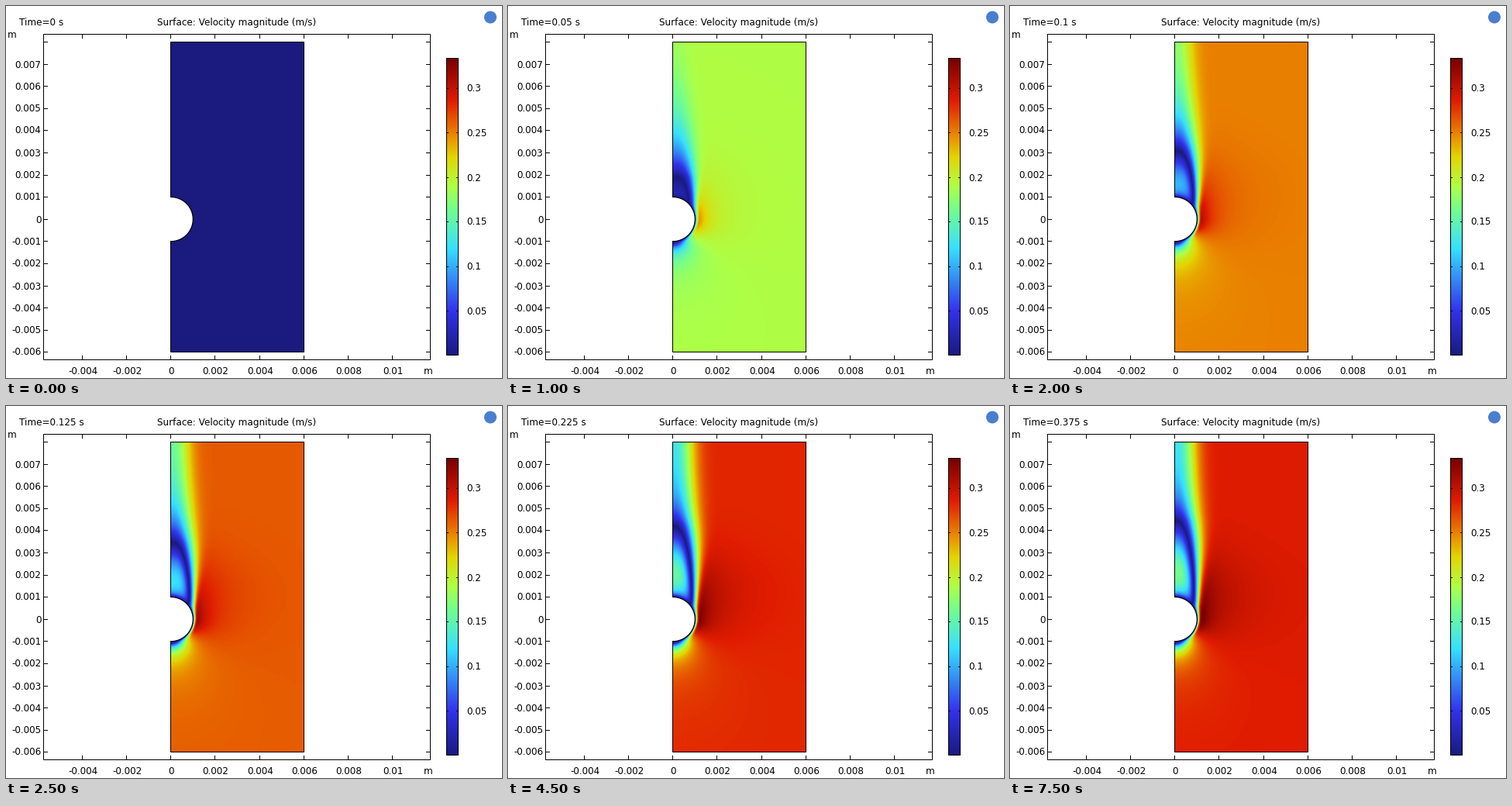
Write a matplotlib script that moves like this. It is 640x480 px and loops after 8000 ms.

```python
import numpy as np
import matplotlib.pyplot as plt
from matplotlib.animation import FuncAnimation
from matplotlib.colors import LinearSegmentedColormap
from matplotlib.patches import Circle, Polygon

W, H, DPI = 640, 480, 100
FRAMES, INTERVAL, DT = 16, 500, 0.025
PX = 72 / DPI
X0, Y0, R = 212.7, 275.1, 28.6  # sphere centre and radius in pixels
LEFT, RIGHT, TOP, BOTTOM = 212.5, 384.5, 46.5, 446.5
VMAX = 0.333

plt.rcParams["font.family"] = "DejaVu Sans"

CMAP = LinearSegmentedColormap.from_list("flow", [
    (0.00, "#1a1a7f"), (0.15, "#3232ec"), (0.36, "#36e0ff"),
    (0.50, "#78ff87"), (0.57, "#adff47"), (0.67, "#e4d400"),
    (0.745, "#ea8700"), (0.86, "#e01c00"), (1.00, "#7a0000")], N=512)

cols = np.arange(213, 385) + 0.5
rows = np.arange(46, 447) + 0.5
X, Y = np.meshgrid((cols - X0) / R, (Y0 - rows) / R)
UP, DOWN = np.maximum(Y, 0), np.minimum(Y, 0)
DIST = np.maximum(np.hypot(X, Y), 1.0)
GAP = DIST - 1


def axis_speed(length, fade):
    """Relative speed on the symmetry axis: backflow, then recovery."""
    back = 0.32 * np.sqrt(max(length - 1.8, 0))
    xi = np.clip((Y - 0.6) / max(length - 0.6, 0.1), 0, 1)
    past = np.maximum(Y - length, 0) / (1.1 + 1.3 * fade)
    return ((0.46 + 0.7 * fade) * (1 - np.exp(-past))
            - back * np.sin(np.pi * xi ** 0.8))


def velocity(t):
    speed = 0.288 * (1 - np.exp(-23.4 * t / (1 + 1.5 * t)))
    length = 4.5 - 4.83 * np.exp(-t / 0.081)  # end of the backflow zone
    fade = np.exp(-(t / 0.105) ** 2)          # share of the starting flow

    # Flow around the sphere, pushed outward by the growing wake
    side = 1 + (0.2 + 0.35 * fade) / DIST ** 3
    outer = np.hypot((1 - DIST ** -2.8) * DOWN / DIST,
                     side * np.where(Y < 0, X / DIST, 1))
    outer += (0.1 * (1 - fade) * np.exp(-((Y - 1.2) / 2) ** 2)
              * np.exp(-np.maximum(X - 1.2, 0) / 1.5)
              * np.clip(GAP / 0.2, 0, 1))

    # Shear layer between the wake and the outer flow
    width = 1.07 - (0.15 + 0.36 * fade) * UP / 8 + 0.1 * np.maximum(DOWN, -1)
    power = 2.3 + 10 * np.exp(-UP / 1.1)
    mix = 1 - np.exp(-(np.hypot(X, DOWN) / width) ** power)
    core = axis_speed(length, fade)
    wake = core + (1 - core) * mix

    # No-slip layer on the sphere
    wall = 1 - np.exp(-GAP / (0.04 + 0.08 * (Y / DIST) ** 4))
    return speed * np.abs(outer * wake * wall)


fig = plt.figure(figsize=(W / DPI, H / DPI), dpi=DPI, facecolor="white")
ax = fig.add_axes([0, 0, 1, 1])
ax.set_axis_off()


def line(xs, ys, width=1.0):
    ax.plot(xs, ys, color="black", lw=width * PX, snap=False,
            solid_capstyle="projecting", solid_joinstyle="miter")


def box(x0, y0, x1, y1):
    line([x0, x1, x1, x0, x0], [y0, y0, y1, y1, y0])


def ticks(x, y, dx, dy):
    """Pair of inward ticks; x and y hold the two starting points."""
    for (a, b), s in zip(zip(x, y), (1, -1)):
        line([a, a + s * dx], [b, b + s * dy])


def center(v):
    return np.floor(v) + 0.5


def label(x, y, text, ha="left"):
    return ax.text(x, y, text, ha=ha, va="baseline", fontsize=12 * PX,
                   color="black")


def show(data, extent):
    return ax.imshow(data, extent=extent, cmap=CMAP, vmin=0, vmax=VMAX,
                     interpolation="nearest", aspect="auto")


field = show(velocity(0), (213, 385, 447, 46))
show(np.linspace(VMAX, 0, 383)[:, None], (569, 584, 451, 68))

# Domain outline with the half sphere cut out
angle = np.linspace(-np.pi / 2, np.pi / 2, 80)
arc_x, arc_y = X0 + R * np.cos(angle), Y0 - R * np.sin(angle)
ax.add_patch(Polygon(np.c_[np.r_[211, arc_x, 211],
                           np.r_[arc_y[0], arc_y, arc_y[-1]]],
                     fc="white", ec="none"))
line(arc_x, arc_y, 1.2)
line([LEFT, LEFT, RIGHT, RIGHT, LEFT, LEFT],
     [Y0 - R, TOP, TOP, BOTTOM, BOTTOM, Y0 + R])

# Plot frame, ticks and labels
L, T, RT, B = 48.5, 36.5, 547.5, 456.5
box(L, T, RT, B)
for n in range(-6, 9):
    y = center(Y0 + 0.2 - n * R)
    ticks((L, RT), (y, y), 5, 0)
    if n < 8:
        label(45.5, y + 4, f"{n / 1000:g}", "right")
for n in range(-4, 11, 2):
    x = center(X0 + n * R)
    ticks((x, x), (T, B), 0, 5)
    label(x + 0.8, 475, f"{n / 1000:g}", "center")
label(2, 41, "m")
label(539, 475, "m")

# Colour bar
box(568.5, 67.5, 583.5, 450.5)
for n in range(1, 7):
    y = center(451 - n * 57.5)
    ticks((568.5, 583.5), (y, y), 2, 0)
    label(594, y + 4, f"{n * 0.05:g}")

label(195, 25.5, "Surface: Velocity magnitude (m/s)")
clock = label(17, 25, "Time=0 s")
ax.add_patch(Circle((625, 14.5), 8, fc="#4a7fd0", ec="none"))
ax.set_xlim(0, W)
ax.set_ylim(H, 0)


def update(i):
    t = i * DT
    field.set_data(velocity(t))
    clock.set_text(f"Time={t:.4g} s")
    return field, clock


anim = FuncAnimation(fig, update, frames=FRAMES, interval=INTERVAL,
                     repeat=True, repeat_delay=0)
plt.show()
```
